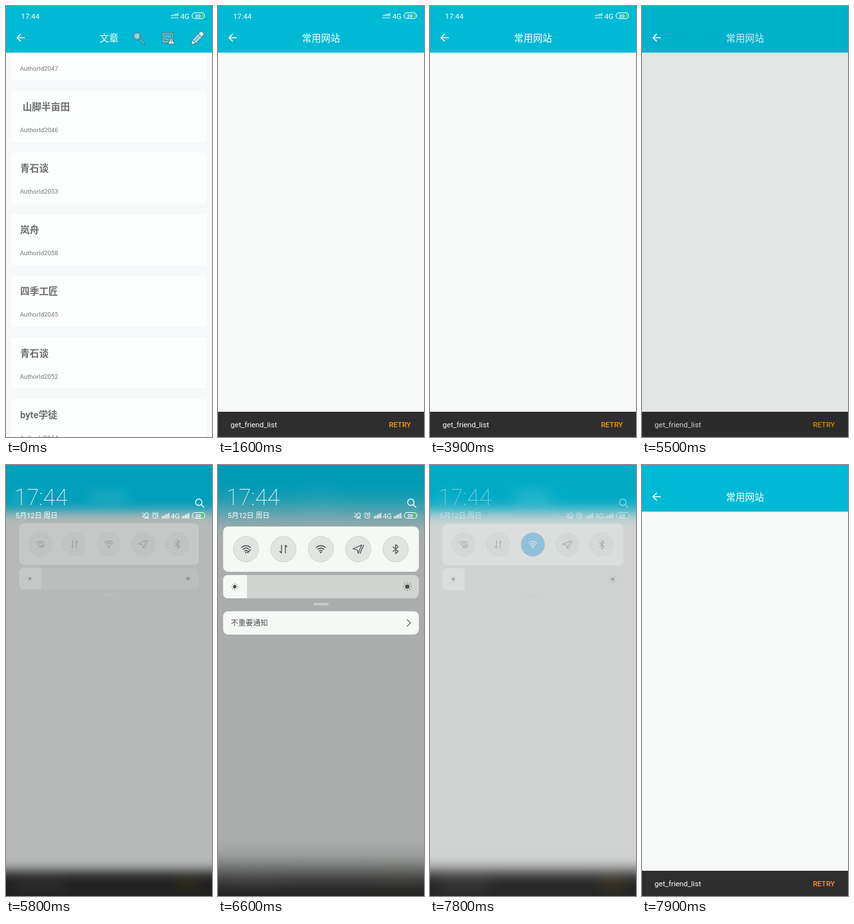
An HTML page that plays this animation: 320 px wide and 666 px high, repeating every 8000 ms.

```html
<!DOCTYPE html>
<html lang="zh-CN">
<head>
<meta charset="utf-8">
<title>Phone screen</title>
<style>
html, body { margin: 0; width: 100%; height: 100%; overflow: hidden; background: #f7f9f8; }
svg { display: block; width: 100%; height: 100%; }
text { font-family: Roboto, "Noto Sans CJK SC", "Noto Sans CJK", sans-serif; white-space: pre; }
.line { fill: none; stroke-linecap: round; stroke-linejoin: round; }
</style>
</head>
<body>
<svg id="stage" viewBox="0 0 320 666"></svg>
<script>
const stage = document.getElementById('stage');

const rect = (x, y, w, h, fill, r = 0, more = '') =>
  `<rect x="${x}" y="${y}" width="${w}" height="${h}" fill="${fill}" rx="${r}" ${more}/>`;
const text = (x, y, size, fill, words, more = '') =>
  `<text x="${x}" y="${y}" font-size="${size}" fill="${fill}" ${more}>${words}</text>`;
const line = (d, color, width = 1.2) =>
  `<path class="line" d="${d}" stroke="${color}" stroke-width="${width}"/>`;
const at = (x, y, inner) => `<g transform="translate(${x} ${y})">${inner}</g>`;

// Status icons
const bars = (x, y) => [0, 1, 2, 3, 4].map(i =>
  rect(x + i * 2.5, y - 3 - i * 1.3, 1.5, 3 + i * 1.3, '#fff')).join('');
const dottedBars = (x, y) => [0, 1, 2, 3, 4].map(i =>
  rect(x + i * 2.5, y - 5.5 - i * .7, 1.4, 1.5 + i * .7, '#fff') +
  rect(x + i * 2.5, y - 2, 1.4, 1.6, '#fff')).join('');
const battery = (x, y) =>
  rect(x, y, 19.5, 9, 'none', 4.5, 'stroke="#fff" stroke-width="1.1"') +
  `<path d="M${x + 15} ${y + 1}a3.5 3.5 0 0 1 0 7z" fill="#5fd04a"/>` +
  text(x + 9, y + 7.2, 7.5, '#fff', '20', 'text-anchor="middle" font-weight="700"');

// Toolbar icons
const toolIcons =
  `<g stroke="#3f6f78" stroke-width="1" stroke-linejoin="round" stroke-linecap="round">
  <path d="M208 51.500l6.500 6.500" stroke-width="3"/>
  <path d="M208.500 52l5.500 5.500" stroke="#8fcdd8" stroke-width="1.200"/>
  <circle cx="203.500" cy="46.500" r="6" fill="#5fcbdc"/>
  <circle cx="203.500" cy="46.500" r="4.300" fill="#8fdce8" stroke-width=".6"/>
  <path d="M243 41h17v16h-17z" fill="#6bcbd9"/><path d="M245.500 43.500h12v10h-12z" fill="#35c0d6" stroke-width=".8"/>
  <path d="M245.500 53.500l4-5 3 3 2-2 3 4z" fill="#7ab4be" stroke-width=".8"/>
  <path d="M257 49.500l5.500 9.500h-11z" fill="#cdeff4"/><path d="M257 53v2.500M257 57.500v.1"/>
  <path d="M287.500 59.500l2-7.500 5.500 5.500z" fill="#e5f5f7"/>
  <path d="M289.500 52l9.500-9.500 5.500 5.500-9.500 9.500z" fill="#a5dde6"/>
  <path d="M299 42.500l2.500-2.500q2-2 4.500.5t.5 4.500l-2 3z" fill="#e5f5f7"/>
  <path d="M292.300 54.700l9.500-9.500" stroke-width=".8"/></g>`;
const header = (title) =>
  rect(-100, 72, 520, 1, '#000', 0, 'opacity=".03"') +
  `<rect class="bar" x="-100" y="-100" width="520" height="172" fill="#00bad5"/>` +
  line('M28.500 49H17.500M22.500 43.500L17 49l5.500 5.500', '#fff', 1.6) +
  text(160, 55, 14.8, '#fff', title, 'text-anchor="middle" class="label"');

// Article list
const authors = [['', 2047], [' 山脚半亩田', 2046], ['青石谈', 2053], ['岚舟', 2058],
  ['四季工匠', 2045], ['青石谈', 2052], ['byte学徒', 2054]];
const cards = authors.map(([name, id], i) => at(0, 36 + i * 95.2,
  rect(8, 0, 304, 79, '#fdfefe', 4) +
  text(22, 29.500, 14.7, '#6c6e6e', name, 'font-weight="700"') +
  text(21.5, 63.500, 9.8, '#757777', 'AuthorId' + id))).join('');

// Quick toggles, each drawn around its own centre
const wifi = c => line('M-7-2.500Q0-8.500 7-2.500M-4.700 .3Q0-3.800 4.700 .3M-2.400 2.900Q0 .9 2.400 2.900', c, 1.3) +
  `<circle cy="5" r="1.3" fill="${c}"/>`;
const gray = '#4b4d4c';
const glyphs = [
  wifi(gray) + line('M2.500 5.500L7 1', '#e2e4e2', 4) + line('M2.500 5.500L7 1M2.500 5.500l.5-2', gray, 1.6),
  line('M-3-6V6l-2.500-2.500M3 6V-6l2.500 2.500', gray, 1.3),
  `<g id="wifiIcon">${wifi(gray)}</g><g id="wifiLit">${wifi('#fff')}</g>`,
  line('M-8-.5L5.500-6.500 0 6.500-1.500 1zM3 6.500L8.500-6.500', gray, 1.2),
  line('M-4-3.500L4 3.500 0 7V-7L4-3.500-4 3.500', gray, 1.2)
];
const toggles = glyphs.map((glyph, i) => at(43.500 + i * 58.100, 130,
  `<circle r="19.700" fill="#e2e4e2" stroke="#c9cbc9" stroke-width=".8"/>` +
  (i === 2 ? '<circle id="wifiDisc" r="20" fill="#0096f0"/>' : '') + glyph)).join('');
const sun = (x, r) => at(x, 188, `<circle r="${r}" fill="${gray}"/>` +
  [0, 45, 90, 135, 180, 225, 270, 315].map(a =>
    `<circle cx="${r * 1.8}" r="${r * .2}" fill="${gray}" transform="rotate(${a})"/>`).join(''));

stage.innerHTML = `
<g id="app">
  <g id="listPage">${rect(0, 0, 320, 666, '#f6f8f9')}${cards}${header('文章')}${toolIcons}</g>
  <g id="sitePage">
    <rect id="paper" x="-100" y="-100" width="520" height="866"/>
    ${header('常用网站')}
    <g id="snack"><rect id="snackBox" x="-100" y="627" width="520" height="140"/>
      ${text(19.5, 651, 11.6, '#fff', 'get_friend_list', 'class="label"')}
      ${text(265.5, 651, 11.3, '#f99a10', 'RETRY', 'font-weight="500" class="label"')}</g>
  </g>
</g>
<g id="status">${text(23.5, 19.5, 11.5, '#fff', '17:44')}${dottedBars(256, 19.5)}
  ${text(271, 19.5, 11.3, '#fff', '4G')}${battery(289, 10.5)}</g>
<g id="clock">
  ${text(13, 62, 35, '#fff', '17:44', 'font-weight="200"')}
  ${text(15, 82, 11, '#fff', '5月12日 周日')}
  <circle cx="299.500" cy="57.500" r="5" fill="none" stroke="#fff" stroke-width="1.300"/>
  ${line('M303.500 61.500l4 4', '#fff', 1.4)}
  ${line('M212 79.500l3-2q1-4 4-3.500t2 4l-1 3.500zM215.500 82l2 .5M212 74l9.500 9', '#fff', 1)}
  <circle cx="232" cy="78.500" r="4" fill="none" stroke="#fff"/>
  ${line('M232 76v2.500h2M227.500 75l2-2M236.500 75l-2-2', '#fff', 1)}
  ${bars(242, 82.5)}${text(256, 82.5, 11.3, '#fff', '4G')}${bars(273, 82.5)}${battery(289.5, 73.5)}
</g>
<g id="panel">
  ${rect(8, 95, 304, 70, '#f6f8f6', 8)}${toggles}
  ${rect(8, 170, 304, 36, '#d2d4d2', 8)}
  <path d="M45 170H16q-8 0-8 8v20q0 8 8 8h29z" fill="#f6f8f6"/>
  ${sun(26, 2.7)}${sun(294, 3.3)}
  ${rect(148, 213, 24, 4, '#c8cac8', 2)}
  <g id="notice">${rect(8, 226, 304, 36, '#f6f8f6', 8)}
    ${text(20, 248.3, 11.5, '#4b4d4c', '不重要通知')}${line('M294 239l5 5-5 5', '#666', 1.3)}</g>
</g>`;

const el = id => document.getElementById(id);
const each = (selector, act) => document.querySelectorAll(selector).forEach(act);
const progress = (t, from, to) => Math.min(1, Math.max(0, (t - from) / (to - from)));
const easeOut = p => 1 - (1 - p) ** 3;
const mix = (a, b, p) => `rgb(${a.map((v, i) => Math.round(v + (b[i] - v) * p))})`;
const move = (id, x, y) => el(id).setAttribute('transform', `translate(${x} ${y})`);
const fade = (id, value) => { el(id).style.opacity = value; };

function draw(t) {
  // Page change, then the message bar; RETRY hides and shows it again
  const slide = easeOut(progress(t, 1000, 1480));
  move('listPage', -80 * slide, 0);
  move('sitePage', 320 * (1 - slide), 0);
  el('sitePage').style.display = slide ? '' : 'none';
  const hidden = t < 3000 ? 1 - easeOut(progress(t, 1300, 1600))
    : easeOut(progress(t, 3100, 3400)) * (1 - easeOut(progress(t, 3550, 3900)));
  move('snack', 0, 40 * hidden);

  // Notification shade
  const leaving = 1 - progress(t, 7700, 7900);
  const dim = (1 - (1 - progress(t, 5400, 6000)) ** 1.7) * leaving;
  const blur = 22 * progress(t, 5500, 6000) ** 1.7 * leaving;
  const alpha = progress(t, 5600, 6000) ** 2 * (1 - progress(t, 7300, 7900) ** 2);
  el('app').style.filter = blur ? `blur(${blur}px)` : 'none';
  each('.bar', bar => bar.setAttribute('fill', mix([0, 186, 213], [0, 154, 181], dim)));
  each('.label', label => { label.style.opacity = 1 - .7 * dim; });
  el('paper').setAttribute('fill', mix([247, 249, 248], [170, 173, 171], dim));
  el('snackBox').setAttribute('fill', mix([45, 46, 45], [30, 31, 30], dim));
  fade('status', t < 5500 ? 1 : 0);
  fade('clock', progress(t, 5500, 5700) * leaving);
  fade('panel', alpha);
  const scale = .89 + .11 * alpha;
  el('panel').setAttribute('transform',
    `translate(160 37) scale(${scale}) translate(-160 -37)`);
  fade('notice', progress(alpha, .6, 1));

  const lit = progress(t, 6600, 7000);
  fade('wifiDisc', lit);
  fade('wifiLit', lit);
  fade('wifiIcon', 1 - lit);
}

const start = performance.now();
function tick() {
  const t = (performance.now() - start) % 8000;
  draw(Math.floor(t / 100) * 100);
  requestAnimationFrame(tick);
}
tick();
</script>
</body>
</html>
```
